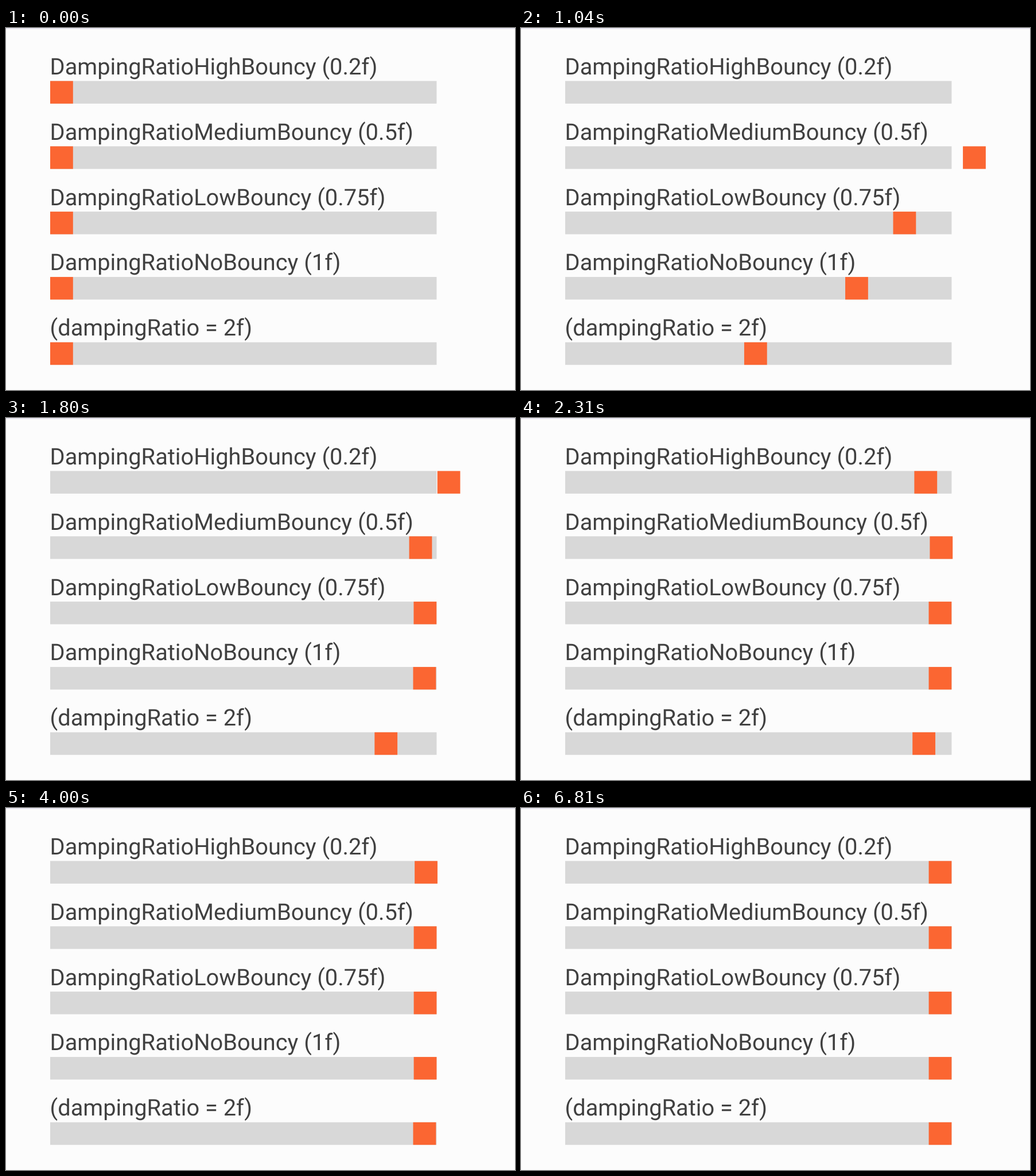
These frames come from a looping animation (887 by 631 pixels, 6830 ms). An HTML page:

```html
<!DOCTYPE html>
<html lang="en">
<head>
<meta charset="utf-8">
<title>Spring damping ratios</title>
<style>
  html, body { margin: 0; width: 100%; height: 100%; overflow: hidden; background: #fcfcfc; }
  svg { display: block; }
  text { font: 400 39.8px Roboto, Arial, sans-serif; fill: #404040; text-rendering: geometricPrecision; filter: blur(.7px); }
  .track { fill: #d8d8d8; }
  .box { fill: #fb6632; }
</style>
</head>
<body>
<svg id="stage" width="887" height="631" viewBox="0 0 887 631">
  <rect width="887" height="2" fill="#e9e7f1"/>
</svg>
<script>
const LOOP = 6830, HOLD = 52, PHASE = 30; // ms
const LEFT = 77, TOP = 92.4, PITCH = 113.85;
const TRAVEL = 633.6, SIZE = 39.8, HEIGHT = 39.4;
const OMEGA = Math.sqrt(50); // stiffness 50, unit mass

const rows = [
  ['DampingRatioHighBouncy (0.2f)', 0.2],
  ['DampingRatioMediumBouncy (0.5f)', 0.5],
  ['DampingRatioLowBouncy (0.75f)', 0.75],
  ['DampingRatioNoBouncy (1f)', 1],
  ['(dampingRatio = 2f)', 2]
];

// Key points from loop time to spring time, in ms; real time after the last
const clock = [[627, 0], [1330, 714], [1798, 1215], [2942, 2348]];

// The picture is held between evenly spaced steps
const held = t => Math.floor((t - PHASE) / HOLD) * HOLD + PHASE;

function springTime(t) {
  if (t <= clock[0][0]) return 0;
  const i = clock.findIndex(([at]) => t <= at);
  if (i < 0) {
    const [at, spring] = clock[clock.length - 1];
    return spring + t - at;
  }
  const [t0, s0] = clock[i - 1], [t1, s1] = clock[i];
  return s0 + (s1 - s0) * (t - t0) / (t1 - t0);
}

// Share of the distance still left; s is spring time times OMEGA
function remaining(zeta, s) {
  if (zeta === 1) return (1 + s) * Math.exp(-s);
  if (zeta < 1) {
    const d = Math.sqrt(1 - zeta * zeta);
    return Math.exp(-zeta * s) * (Math.cos(d * s) + zeta / d * Math.sin(d * s));
  }
  const d = Math.sqrt(zeta * zeta - 1), slow = zeta - d, fast = zeta + d;
  return (fast * Math.exp(-slow * s) - slow * Math.exp(-fast * s)) / (2 * d);
}

const stage = document.getElementById('stage');

function add(tag, attrs, text = '') {
  const el = document.createElementNS('http://www.w3.org/2000/svg', tag);
  for (const key in attrs) el.setAttribute(key, attrs[key]);
  el.textContent = text;
  return stage.appendChild(el);
}

const boxes = rows.map(([label, zeta], i) => {
  const y = TOP + i * PITCH;
  add('text', { x: LEFT - 0.4, y: y - 11.6 }, label);
  add('rect', { class: 'track', x: LEFT, y, width: TRAVEL + SIZE, height: HEIGHT });
  return { zeta, el: add('rect', { class: 'box', x: LEFT, y, width: SIZE, height: HEIGHT }) };
});

const start = performance.now();

function draw() {
  const t = (performance.now() - start) % LOOP;
  const s = springTime(held(t)) / 1000 * OMEGA;
  for (const { zeta, el } of boxes) {
    el.setAttribute('x', LEFT + TRAVEL * (1 - remaining(zeta, s)));
  }
  requestAnimationFrame(draw);
}
draw();
</script>
</body>
</html>
```
